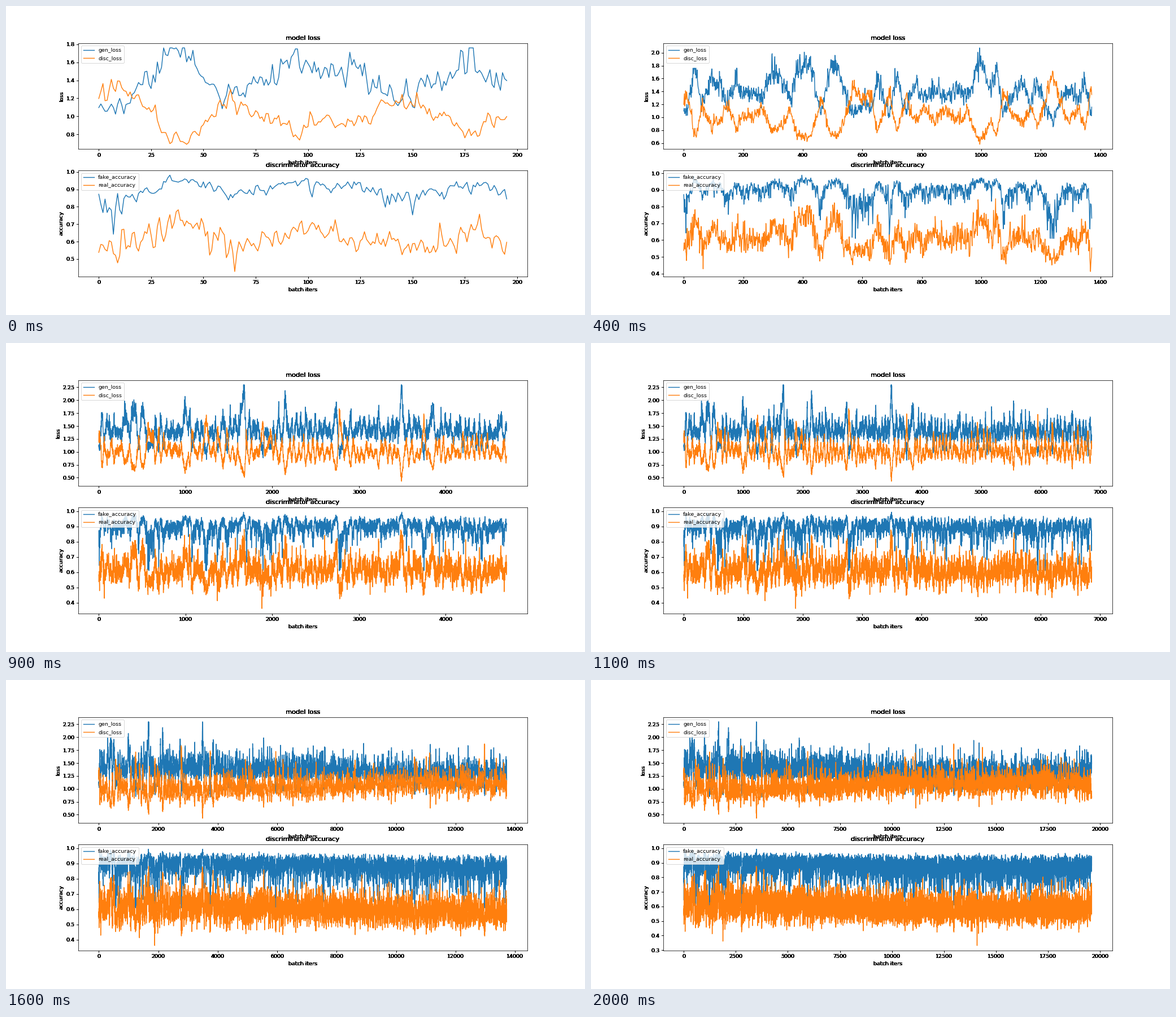
A matplotlib script for the animation above (2100 ms loop, 1025 by 547 pixels).

```python
import numpy as np
import matplotlib.pyplot as plt
from matplotlib.animation import FuncAnimation
from matplotlib.axes import Axes

W, H = 1025, 547
DPI = 68.34  # a 15 inch wide figure
BATCHES = 196
FRAMES = 21

# Epochs trained so far, speeding up over the loop
epochs = np.interp(range(FRAMES), [0, 4, 6, 9, 11, 16, 20],
                   [1, 7, 12, 24, 35, 70, 100]).round().astype(int)
N = BATCHES * int(epochs[-1])
t = np.arange(N)
rng = np.random.default_rng(12)

# Main swings of the discriminator loss: (batch, value)
SWINGS = [(0, 1.29), (12, 1.32), (25, 1.02), (34, .73), (41, .73), (62, 1.18), (95, .83),
          (110, .98), (120, .88), (140, 1.18), (150, 1.2), (178, .82), (195, 1.04),
          (295, .78), (383, .72), (425, .69), (462, 1.35), (490, .76), (568, 1.45),
          (632, 1.3), (650, .8), (694, 1.4), (715, .78), (747, 1.35), (995, .64),
          (1050, .7), (1073, 1.38), (1240, 1.68), (1368, 1.45), (1433, .72), (1480, 1.45),
          (1680, .54), (1893, 1.6), (1985, 1.4), (2148, .58), (2740, .65), (2775, 1.7),
          (3490, .47), (3750, 1.65), (3850, .66)]


def trend():
    """Join the main swings, with seeded smaller ones in the gaps between."""
    knots, sign = [], 1
    for (a, va), (b, _) in zip(SWINGS, SWINGS[1:] + [(N, 1)]):
        knots.append((a, np.log(va)))
        at = a + rng.integers(18, 40)
        while a >= BATCHES - 1 and at < b - 15:
            sign = -sign
            late = np.clip((at - 7000) / 2500, 0, 1)
            swing = abs(rng.normal(0.14, 0.12))
            knots.append((at, 0.01 + 0.09 * late + sign * swing))
            at += rng.integers(18, 40)
    return np.exp(np.interp(t, *zip(*knots)))


def rough(sd):
    w = rng.normal(size=N + 1)
    return np.exp(sd * (w[1:] + 0.6 * w[:-1]) / 1.17)


def set_records(low, high, limits):
    """Fix the lowest and highest value reached by the end of each phase."""
    start = 0
    for stop, (lo, hi) in zip((196, 1372, 2352, N), limits):
        a, b = low[start:stop], high[start:stop]
        a[:], b[:] = a.clip(lo), b.clip(None, hi)
        a[a.argmin()], b[b.argmax()] = lo, hi
        start = stop


base = trend()
disc = base * rough(0.05)
gen = 1.39 * base ** -0.75 * rough(0.06)
fake = (1 - 0.1 * base ** 2.2 * rough(0.28)).clip(0.61)
real = 0.61 * base ** -0.48 * rough(0.07)
set_records(disc, gen, [(.69, 1.76), (.58, 2.075), (.506, 2.297), (.43, 2.297)])
set_records(real, fake, [(.428, .982), (.412, .989), (.361, .994), (.331, .994)])


class HeavyAxes(Axes):
    """Axes whose outer text is printed many times, so its soft edges turn black."""

    def draw(self, renderer):
        super().draw(renderer)
        for _ in range(9):
            for part in (self.xaxis, self.yaxis, self.title):
                part.draw(renderer)


plt.rcParams.update({"font.family": "DejaVu Sans", "font.size": 10})
fig = plt.figure(figsize=((W + 0.01) / DPI, (H + 0.01) / DPI), dpi=DPI, facecolor="white")
fig.subplots_adjust(left=0.125, right=0.9, bottom=0.125, top=0.88, hspace=0.2)


def panel(row, title, ylabel, series):
    ax = fig.add_subplot(2, 1, row, axes_class=HeavyAxes)
    lines = [(ax.plot([], [], lw=1.5, label=name)[0], y) for name, y in series]
    ax.set(title=title, xlabel="batch iters", ylabel=ylabel)
    ax.legend(loc="upper left")
    return ax, lines


panels = [
    panel(1, "model loss", "loss", [("gen_loss", gen), ("disc_loss", disc)]),
    panel(2, "discriminator accuracy", "accuracy",
          [("fake_accuracy", fake), ("real_accuracy", real)]),
]


def update(frame):
    n = epochs[frame] * BATCHES
    for ax, lines in panels:
        for line, y in lines:
            line.set_data(t[:n], y[:n])
        ax.relim()
        ax.autoscale_view()
    return []


anim = FuncAnimation(fig, update, frames=FRAMES, init_func=lambda: update(0),
                     interval=100, repeat=True, repeat_delay=0, blit=False)
plt.show()
```
